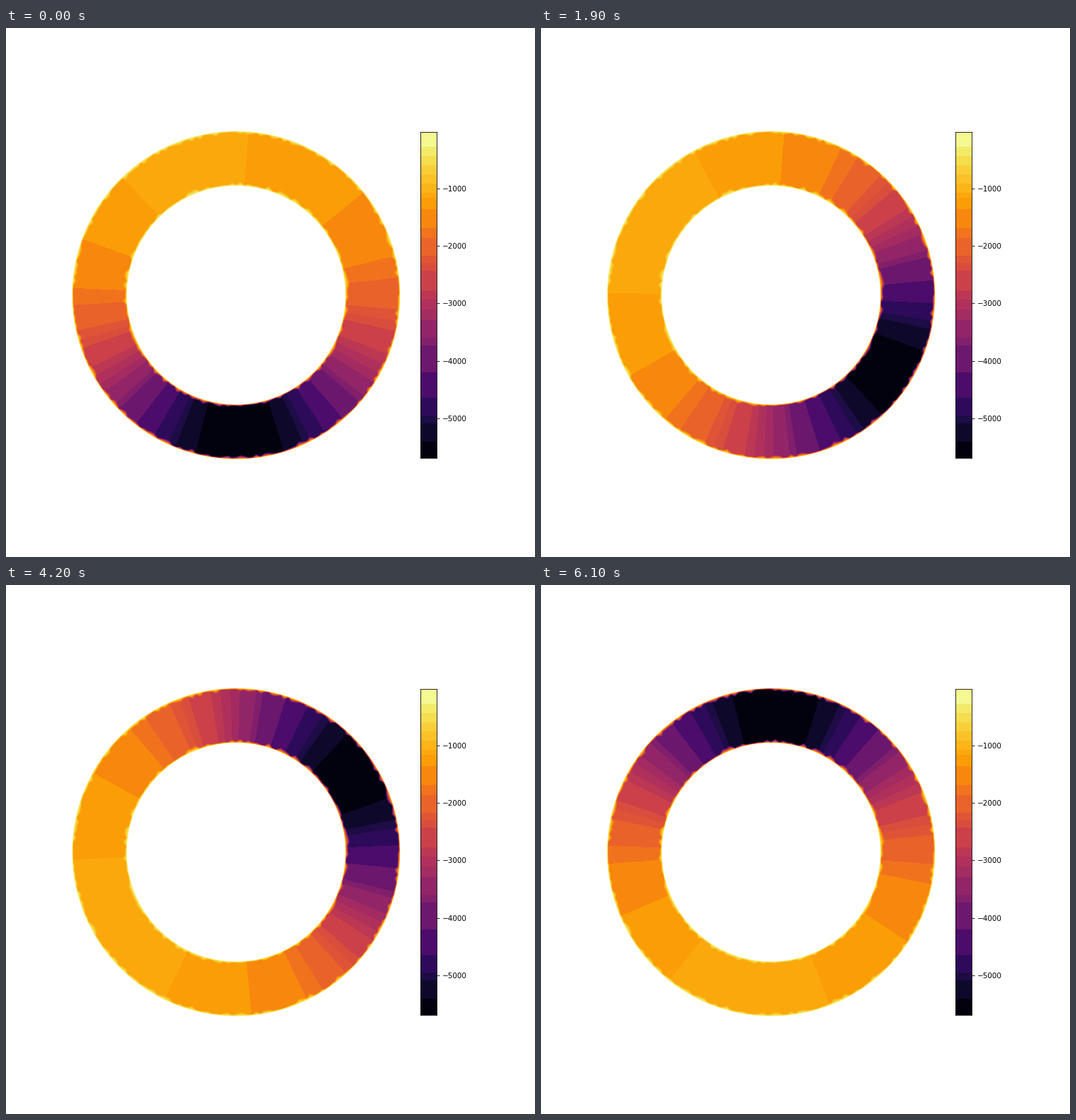
These frames come from a looping animation (748x748 px, 6.2 s). A matplotlib script:

```python
import numpy as np
import matplotlib.pyplot as plt
from matplotlib.animation import FuncAnimation

SIZE, DPI = 748, 64
POINT = 1.04 * 72 / DPI            # one typographic point at this scale
FRAMES, INTERVAL = 62, 100

# Default subplot area, split into a square plot and a shrunken colour bar
LEFT, BOTTOM, WIDTH, HEIGHT = 0.125, 0.11, 0.775, 0.77
R_OUT = 0.4 * WIDTH * SIZE
R_IN = R_OUT * 2 / 3
CX = LEFT * SIZE + R_OUT
CY = SIZE * (1 - BOTTOM - HEIGHT / 2)
BAR_HEIGHT = 0.8 * HEIGHT
BAR_BOX = [LEFT + 0.85 * WIDTH, BOTTOM + 0.1 * HEIGHT,
           BAR_HEIGHT / 20, BAR_HEIGHT]
V_MIN, V_MAX = -5688, -25

BOX_X, BOX_Y, BOX = 90, 142, 472   # square patch that holds the ring

# Heights on the colour scale where the flat shades change
DARK_LEVELS = [.050, .106, .131, .185, .263, .345, .369, .424, .455, .486,
               .515, .576, .599, .622, .676, .705, .764, .80]
BOUNDS = np.array([0, *DARK_LEVELS, *np.arange(.815, .97, .028), 1])
SHADES = (BOUNDS[:-1] + BOUNDS[1:]) / 2

cmap = plt.get_cmap("inferno")


def profile(away):
    """Field on the colour scale at an angle away from the dark pole."""
    return 0.81 * (1 - np.exp(-(away / 65.6) ** 1.8))


def ragged_rim(angle, depth, count, rng):
    """Strength of the bright rim at a depth inside an edge."""
    reach = 1.9 + 5.5 * rng.random(count) ** 2.4
    nodes = np.linspace(0, 360, count, endpoint=False)
    reach = np.interp(angle, nodes, reach, period=360)
    return 0.92 * np.clip(1 - np.maximum(depth, 0) / reach, 0, 1)


# Polar geometry of the patch; angles run counter-clockwise from straight down
grid = np.arange(BOX) + 0.5
dx, dy = np.meshgrid(grid + BOX_X - CX, grid + BOX_Y - CY)
radius = np.hypot(dx, dy)
alpha = np.clip(R_OUT - radius + .5, 0, 1) * np.clip(radius - R_IN + .5, 0, 1)
inside = alpha > 0
psi = np.degrees(np.arctan2(dx, dy))[inside]
r = radius[inside]

rng = np.random.default_rng(7)
rim = np.maximum(ragged_rim(psi, R_OUT - r, 250, rng),
                 ragged_rim(psi, r - R_IN, 170, rng))


def ring_image(frame):
    pole = 1.2 + 180 * frame / FRAMES
    rel = (psi - pole + 180) % 360 - 180

    # The bright side lags as the motion starts and again as it ends
    lag = 16 * np.exp(-frame / 10) - 7 * np.exp((frame - FRAMES + 1) / 4)
    away = np.abs(rel - lag * np.abs(rel / 150) ** 3)

    # The dark wedge is widest at the bottom and the top
    widen = 2 * np.cos(2 * np.radians(pole))
    away = np.maximum(away - widen * np.exp(-(away / 30) ** 2), 0)

    shade = SHADES[np.digitize(profile(away), BOUNDS) - 1]
    image = np.zeros((BOX, BOX, 4))
    image[inside] = cmap(shade + (0.98 - shade) * rim)
    image[..., 3] = alpha
    return image


def draw_colorbar(fig):
    ax = fig.add_axes(BAR_BOX)
    values = V_MIN + BOUNDS * (V_MAX - V_MIN)
    for low, high, shade in zip(values, values[1:], SHADES):
        ax.axhspan(low, high, color=cmap(shade), lw=0, antialiased=False)
    ax.set(xlim=(0, 1), ylim=(V_MIN, V_MAX), xticks=[],
           yticks=range(-5000, 0, 1000))
    ax.yaxis.tick_right()
    ax.tick_params(axis="y", labelsize=10 * POINT, length=3.5 * POINT,
                   pad=3.5 * POINT, width=0.8 * POINT)
    for spine in ax.spines.values():
        spine.set_linewidth(0.8 * POINT)


plt.rcParams["font.family"] = "DejaVu Sans"
fig = plt.figure(figsize=(SIZE / DPI, SIZE / DPI), dpi=DPI, facecolor="white")
draw_colorbar(fig)
ring = fig.figimage(ring_image(0), xo=BOX_X, yo=SIZE - BOX_Y - BOX,
                    origin="upper")


def update(frame):
    ring.set_data(ring_image(frame))
    return [ring]


anim = FuncAnimation(fig, update, frames=FRAMES, interval=INTERVAL,
                     repeat=True, repeat_delay=0, blit=False)
plt.show()
```
